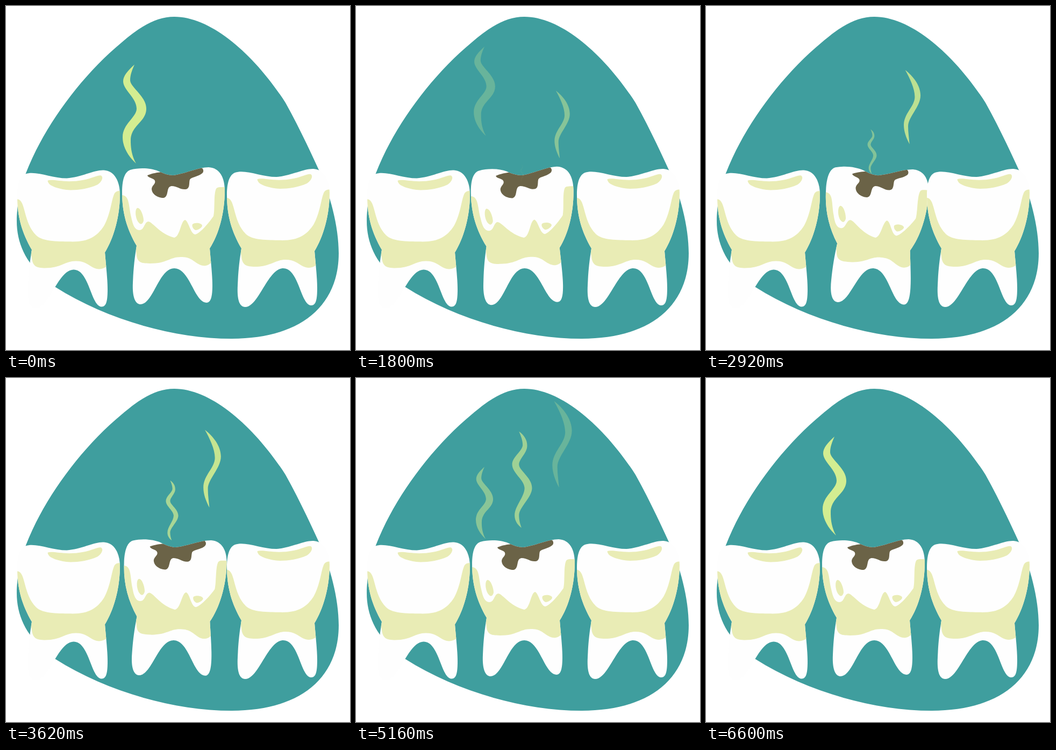
These frames come from a looping animation (640x640 px, 6.8 s). An HTML page:

```html
<!DOCTYPE html>
<html lang="en">
<head>
<meta charset="utf-8">
<title>Tooth decay</title>
<style>
  html, body { margin: 0; width: 100%; height: 100%; overflow: hidden; background: #fff; }
  svg { display: block; width: 100vw; height: 100vh; }
  .enamel { fill: #fefefe; }
  .plaque { fill: #e9ecb5; }
  .decay { fill: #6b6347; }
  .wisp { fill: #d3ed91; }
</style>
</head>
<body>
<svg viewBox="0 0 640 640">
  <defs>
    <path id="sideShape" d="M426 310C445 303 475 318 503 318C530 316 555 302 572 303C592 304 602 324 602 348C602 390 590 430 574 456C576 480 579 505 579 525C579 545 577 557 568 557C548 557 545 488 516 488C487 488 470 560 445 560C432 560 430 540 431 520C432 495 434 475 438 451C420 420 411 390 411 352C411 333 414 315 426 310Z"/>
    <path id="midShape" d="M231 305C250 300 270 302 283 307C293 312 303 315 311 315C330 313 358 300 377 300C398 301 407 320 407 343C407 385 396 425 379 451C381 475 384 500 384 520C384 541 381 552 373 552C350 551 342 488 313 488C284 488 274 555 250 555C238 554 235 535 236 515C237 490 239 470 243 446C225 415 216 385 216 347C216 325 220 309 231 305Z"/>
    <clipPath id="sideClip"><use href="#sideShape"/></clipPath>
    <clipPath id="midClip"><use href="#midShape"/></clipPath>
    <g id="sideTooth">
      <use href="#sideShape" class="enamel"/>
      <g clip-path="url(#sideClip)" class="plaque">
        <path d="M405 357L412 357C427 360 422 400 446 424C459 437 490 435 514 436C545 436 560 425 572 407C584 386 586 360 591 348C594 341 600 341 610 342L610 470L577 482C571 487 562 489 552 484C541 478 536 472 520 472C500 472 492 485 463 485C447 485 440 482 438 467L436 455L405 440Z"/>
        <path d="M468 322C480 319 500 328 535 321C550 318 562 311 567 313C572 316 568 325 560 330C545 337 525 340 510 340C490 339 474 333 470 328C468 325 467 323 468 322Z"/>
      </g>
    </g>
  </defs>

  <path fill="#3f9e9e" d="M313 20C382 20 462 90 520 180C545 225 565 268 582 305C603 350 619 410 619 460C619 560 545 619 420 619C310 619 185 582 92 523C40 487 20 445 20 400C20 370 28 335 37 311C70 225 140 130 215 68C250 38 280 20 313 20Z"/>

  <use href="#sideTooth" x="-390" y="2.5"/>
  <g id="badTooth">
    <use href="#midShape" class="enamel"/>
    <g clip-path="url(#midClip)">
      <path class="plaque" d="M210 352L217 352C230 354 228 372 233 393C236 408 240 417 248 417C258 417 257 401 265 401C273 402 286 424 313 431C324 429 325 400 333 398C340 400 343 424 352 425C360 424 378 403 386 391C389 379 386 350 391 340C393 336 400 337 412 337L412 465L382 477C377 483 368 486 358 480C346 473 343 467 325 467C304 467 300 479 268 479C252 479 245 477 243 465L241 450L210 435Z"/>
      <path class="plaque" d="M244 376C250 374 256 390 256 399C255 405 251 408 247 403C241 397 239 379 244 376Z"/>
      <path class="plaque" d="M347 406C352 402 365 404 365 409C364 413 357 417 353 417C349 416 345 410 347 406Z"/>
      <path class="decay" d="M263 315C273 311 281 310 288 309L311 305L340 303L362 300C368 302 369 309 364 312C356 318 345 318 342 323C340 329 343 340 334 341C324 342 319 335 308 335C297 336 304 355 293 357C282 357 271 350 271 340C272 333 279 331 277 325C275 320 264 320 263 315Z"/>
    </g>
  </g>
  <use href="#sideTooth"/>

  <path id="left" class="wisp" d="M239 109C226 121 218 130 218 140C218 156 243 171 243 191C243 207 217 219 217 244C217 264 229 281 242 293C233 277 232 262 232 250C232 222 261 216 261 191C261 168 231 151 231 138C231 128 235 118 239 109Z"/>
  <path id="middle" class="wisp" d="M304 132C314 139 318 148 317 157C316 167 304 177 304 185C304 195 325 206 325 223C325 238 304 254 304 267C304 275 306 281 308 287C301 282 297 275 297 267C297 252 313 237 313 223C313 210 293 199 293 185C293 173 309 164 310 154C310 146 307 139 304 132Z"/>
  <path id="right" class="wisp" d="M369 62C385 74 401 94 401 115C401 139 375 160 375 180C375 193 377 205 378 217C371 204 366 190 366 177C366 153 389 138 389 118C389 100 378 78 369 62Z"/>
</svg>
<script>
  const LOOP = 6800, LAST = 59;
  const BEAT = 560, OFFSETS = [0, 140, 180, 320, 440];
  const ROCK = [[13, 0], [20, -3.55], [27, 3.55], [37, 0]];
  const $ = id => document.getElementById(id);

  // Stepped clock: five uneven holds per beat.
  function stepAt(ms) {
    const u = ms - 120;
    if (u < 0) return 0;
    const held = OFFSETS.filter(o => o <= u % BEAT).length;
    return Math.min(LAST, Math.floor(u / BEAT) * 5 + held);
  }

  const ease = x => x < 0.5 ? 4 * x ** 3 : 1 - 4 * (1 - x) ** 3;

  function rockAngle(s) {
    for (let k = 1; k < ROCK.length; k++) {
      const [s0, a0] = ROCK[k - 1], [s1, a1] = ROCK[k];
      if (s >= s0 && s < s1) return a0 + (a1 - a0) * ease((s - s0) / (s1 - s0));
    }
    return 0;
  }

  // Opacity that climbs to 1 at the peak and falls back to 0.
  function glow(s, start, peak, end) {
    return Math.max(0, Math.min((s - start) / (peak - start), (end - s) / (end - peak)));
  }

  function place(id, x, y, top, scale, opacity) {
    const el = $(id);
    el.setAttribute("transform", `translate(${x} ${top}) scale(${Math.max(scale, 0.01)}) translate(${-x} ${-y})`);
    el.setAttribute("opacity", opacity);
  }

  function draw(ms) {
    const s = stepAt(ms);
    $("badTooth").setAttribute("transform", `rotate(${rockAngle(s)} 313 463)`);

    const d = s < 30 ? s : s - LAST;
    const rising = d < 0;
    place("left", 239, 109,
      109 - d * (rising ? 4.33 : 2.1),
      1 + (rising ? 3.83 : -1.12) * d / 184,
      glow(d, -26, 0, 22));

    const e = s - 41;
    place("middle", 309, 132, 132 - 6.5 * e, 1 + 4.83 * e / 155, glow(s, 15, 39, 59));
    place("right", 384, 62, 62 - 3.82 * e, 1 + 1.16 * e / 155, glow(s, 3, 30, 52));
  }

  const begin = performance.now();
  function tick() {
    draw((performance.now() - begin) % LOOP);
    requestAnimationFrame(tick);
  }
  tick();
</script>
</body>
</html>
```
